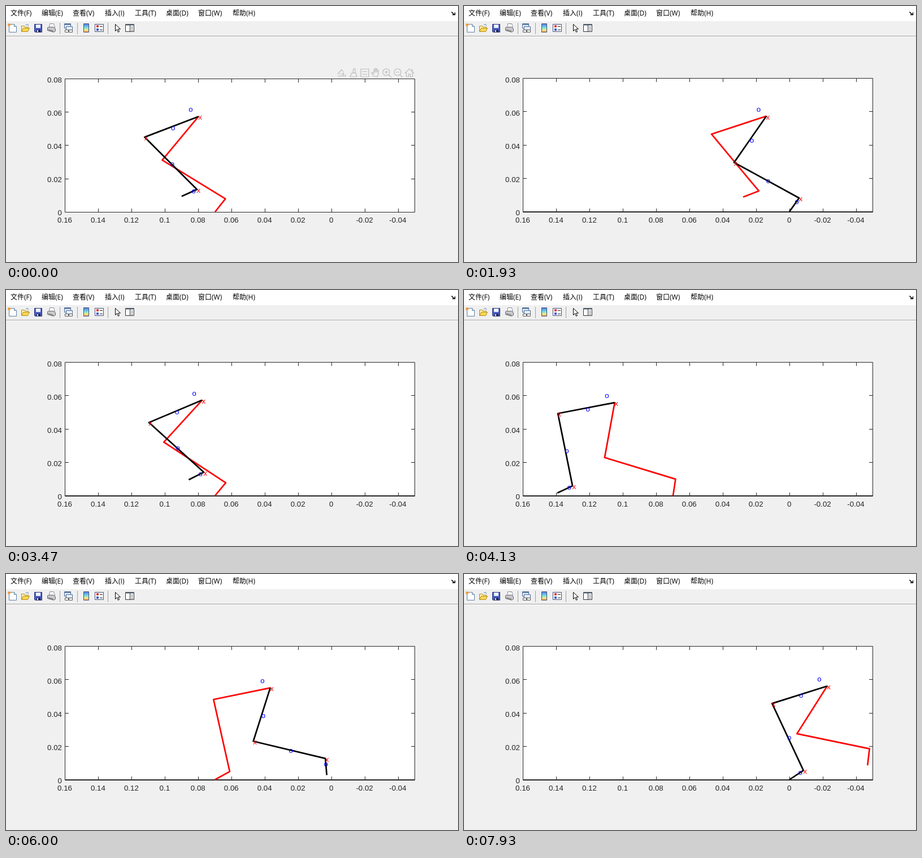
Write an HTML page that moves like this. It is 800 px wide and 455 px high and loops after 8000 ms.

```html
<!DOCTYPE html>
<html lang="zh">
<head>
<meta charset="utf-8">
<title>Walking legs</title>
<style>
html, body { margin: 0; width: 100%; height: 100%; overflow: hidden; background: #f0f0f0; }
svg { display: block; width: 800px; height: 455px; }
.menu { font: 12px "Open Sans", "Noto Sans CJK SC", "Noto Sans CJK JP", "Noto Sans CJK", sans-serif; }
.plot text { font: 13.3px "Liberation Sans", Arial, sans-serif; }
.leg { fill: none; stroke-width: 2.7; stroke-linejoin: round; }
</style>
</head>
<body>
<svg viewBox="0 0 800 455">
  <defs><clipPath id="clip"><rect x="104" y="128" width="620" height="239"/></clipPath></defs>
  <rect width="800" height="455" fill="#f0f0f0"/>
  <rect width="800" height="27" fill="#fff"/>
  <g class="menu" id="menu"></g>
  <path d="M788.5 10.5l5 5M790 15.5h4.5v-4" fill="none" stroke="#000" stroke-width="1.5"/>
  <path d="M0 53.5H800" stroke="#a0a0a0"/>
  <path d="M0 54.5H800" stroke="#fff"/>
  <path d="M95.5 30v20M126.5 30v20M180.5 30v20" stroke="#a0a0a0"/>

  <g id="tools" stroke-width="1">
    <path d="M5.5 32.5h9l4 4v10h-13z" fill="#fff" stroke="#5f7f9f"/>
    <path d="M14.5 32.5v4h4" fill="#dce8f4" stroke="#5f7f9f"/>
    <circle cx="5.5" cy="33.5" r="2.5" fill="#f29a3c"/>
    <path d="M27.5 45.5v-10h5l1 2h6v3" fill="#fff0a8" stroke="#b08a20"/>
    <path d="M27.5 45.5l3-6h11l-3 6z" fill="#ffd84d" stroke="#b08a20"/>
    <path d="M35 34q3-3 5 1" fill="none" stroke="#3c6eb4"/>
    <path d="M50.5 32.5h13v14h-12l-1-1z" fill="#4a5fc8" stroke="#25307c"/>
    <path d="M53 33h8v6h-8z" fill="#eef3ff"/>
    <path d="M54 42h7v4h-7z" fill="#20264e"/>
    <path d="M55 43h2v3h-2z" fill="#fff"/>
    <path d="M76.5 38.5l1-7h7l2 7z" fill="#fff" stroke="#889"/>
    <path d="M73.5 38.5l2-1h9l3 3v4l-3 2-11-3z" fill="#c8c8cc" stroke="#666"/>
    <path d="M75 42l9 3" stroke="#555"/>
    <path d="M103.5 31.5h11v8h-11z" fill="#e4eefa" stroke="#4a6a98"/>
    <path d="M103 32.5h12" stroke="#4a6a98" stroke-width="2"/>
    <path d="M106.5 36.5h11v6h-11z" fill="#e4eefa" stroke="#4a6a98"/>
    <path d="M104.5 42.5h6v4h-6zM111.5 42.5h6v4h-6z" fill="#fff" stroke="#555"/>
    <linearGradient id="bar" x2="0" y2="1">
      <stop stop-color="#5577e0"/><stop offset=".45" stop-color="#70dce8"/>
      <stop offset=".75" stop-color="#f6ee80"/><stop offset="1" stop-color="#f09060"/>
    </linearGradient>
    <path d="M137.5 31.5h9v15h-9z" fill="url(#bar)" stroke="#3f4f78"/>
    <path d="M157.5 32.5h15v13h-15z" fill="#fff" stroke="#3f4f78"/>
    <path d="M160 34h4v4h-4z" fill="#d83c3c"/>
    <path d="M160 40h4v4h-4z" fill="#4058d0"/>
    <path d="M166 36.5h5m-5 6h5" stroke="#222"/>
    <path d="M193.5 32.5v12l3-3 2 5 2-1-2-4.5h4z" fill="#fff" stroke="#000"/>
    <path d="M211.5 32.5h15v13h-15z" fill="#fff" stroke="#333"/>
    <path d="M211 33.5h16" stroke="#567" stroke-width="2"/>
    <path d="M219.5 34v12" stroke="#333"/>
    <path d="M221 37.5h4m-4 3h4m-4 3h4" stroke="#678"/>
  </g>

  <g class="plot">
    <g id="axes"></g>
    <g id="hover" fill="none" stroke="#bdbdbd" stroke-width="1.2">
      <path d="M587 121l7-8 3 4M590 121h8l-2-3m2 3l-2 3M587 124.5h14v-3"/>
      <path d="M615 111.500h3v7h-4zM612 119h7l2 7h-12z"/>
      <path d="M628 112h14v14h-14zM631 116.5h8m-8 5h8"/>
      <path d="M651 125l-4-6 1-1 3 2v-7h2v5-7h2v7-6h2v6-4h2v7l-2 5z"/>
      <circle cx="673" cy="117.5" r="6"/><path d="M677 122l5 5M670 117.5h6m-3-3v6"/>
      <circle cx="693" cy="117.5" r="6"/><path d="M697 122l5 5M690 117.5h6"/>
      <path d="M706 119.5l8-8 8 8M708.5 118v8h4v-5h3v5h4v-8M719 116v-4"/>
    </g>
    <g clip-path="url(#clip)">
      <polyline class="leg" id="red" stroke="#f00"/>
      <polyline class="leg" id="black" stroke="#000"/>
    </g>
    <g id="marks" text-anchor="middle"></g>
  </g>
</svg>
<script>
const $ = id => document.getElementById(id);
const SVG = 'http://www.w3.org/2000/svg';
const LOOP = 8000, TICK = 1000 / 15;

function add(parent, tag, attrs, text) {
  const el = document.createElementNS(SVG, tag);
  for (const k in attrs) el.setAttribute(k, attrs[k]);
  if (text !== undefined) el.textContent = text;
  parent.appendChild(el);
  return el;
}

[['文件(F)', 8], ['编辑(E)', 63], ['查看(V)', 118], ['插入(I)', 175],
 ['工具(T)', 228], ['桌面(D)', 283], ['窗口(W)', 340], ['帮助(H)', 401]]
  .forEach(([s, x]) => add($('menu'), 'text', { x, y: 17 }, s));

// Axes: box, ticks and labels
const ink = '#262626';
const box = add($('axes'), 'path', { fill: '#fff', stroke: ink });
const ground = add($('axes'), 'path', { d: 'M104 365.5H724', stroke: ink });
for (let i = 0; i <= 10; i++) {
  add($('axes'), 'text', { x: 104 + 58.95 * i, y: 385, fill: ink, 'text-anchor': 'middle' },
    +(0.16 - 0.02 * i).toFixed(2));
}
for (let i = 0; i <= 4; i++) {
  add($('axes'), 'text', { x: 99, y: 372 - 59 * i, fill: ink, 'text-anchor': 'end' }, +(0.02 * i).toFixed(2));
}

function drawBox(top) {
  let d = `M104.5 ${top}H723.5V366.5H104.5Z`;
  for (let i = 1; i <= 10; i++) {
    const x = Math.floor(104.5 + 58.95 * i) + 0.5;
    d += `M${x} ${top}v6.5M${x} 366.5v-6.5`;
  }
  for (let i = 1; i <= 3; i++) {
    const y = Math.ceil(366.5 - (366.5 - top) * i / 4) - 0.5;
    d += `M104.5 ${y}h6.5M723.5 ${y}h-6.5`;
  }
  box.setAttribute('d', d);
}

const marks = [...'oxoxoxo'].map(c =>
  add($('marks'), 'text', { fill: c === 'x' ? '#f00' : '#00f' }, c));

// Step phase, then foot, shank and thigh angles of the standing and the swinging leg
const poses = [
  [.054, 27.4, 101.5, 11.5, 93, 165, 76.5],
  [.104, 29.1, 102.6, 12, 94.8, 166.5, 73],
  [.214, 31.8, 109.1, 15.1, 91, 168.3, 64],
  [.276, 33.6, 115, 18.2, 83.2, 168.2, 58.6],
  [.594, 52, 148.4, 51.3, 24.4, 134.9, 21.7],
  [.781, 66.4, 159.2, 73.4, 18.7, 110.6, 11.6],
  [.969, 81.5, 163, 80, 25.3, 101.4, 11.3]
];
// The legs trade roles at every step
const swap = (p, shift) => [p[0] + shift, ...p.slice(4), ...p.slice(1, 4)];
const keys = [swap(poses[5], -1), swap(poses[6], -1), ...poses, swap(poses[0], 1), swap(poses[1], 1)];

const slope = (a, b, j) => (b[j] - a[j]) / (b[0] - a[0]);
function tangent(i, j) {
  const [a, b, c] = [keys[i - 1], keys[i], keys[i + 1]];
  return (slope(a, b, j) * (c[0] - b[0]) + slope(b, c, j) * (b[0] - a[0])) / (c[0] - a[0]);
}
function poseAt(u) {
  let i = 1;
  while (i < keys.length - 3 && keys[i + 1][0] < u) i++;
  const a = keys[i], b = keys[i + 1], h = b[0] - a[0], s = (u - a[0]) / h, r = 1 - s;
  return [1, 2, 3, 4, 5, 6].map(j =>
    r * r * (1 + 2 * s) * a[j] + s * s * (1 + 2 * r) * b[j] +
    h * s * r * (r * tangent(i, j) - s * tangent(i + 1, j)));
}

// Walking pace: tick and number of steps done
const pace = [[0, 1.594], [14, 2.01], [15, 2.054], [43, 3.214], [62, 3.969],
  [90, 5.104], [108, 5.781], [119, 6.276]];
function stepsAt(n) {
  let i = 0;
  while (i < pace.length - 2 && pace[i + 1][0] < n) i++;
  const [a, b] = [pace[i], pace[i + 1]];
  return a[1] + (b[1] - a[1]) * (n - a[0]) / (b[0] - a[0]);
}

// Reach of foot, shank and thigh along x and y
const bones = [[29.7, 29.7], [131.2, 131.2], [102.6, 99.2]];
function bone(k, deg) {
  const a = deg * Math.PI / 180;
  return [bones[k][0] * Math.cos(a), -bones[k][1] * Math.sin(a)];
}
const plus = (p, q, m = 1) => [p[0] + q[0] * m, p[1] + q[1] * m];
const mid = (p, q, m = .5) => [p[0] + (q[0] - p[0]) * m, p[1] + (q[1] - p[1]) * m];

function drawLeg(id, pts) {
  $(id).setAttribute('points', pts.map(p => p.map(v => v.toFixed(2)).join()).join(' '));
}

function render(t) {
  const n = Math.min(119, Math.floor((t + 5) / TICK));
  const early = n < 14;
  drawBox(early ? 129.5 : 128.5);
  ground.style.display = early ? 'none' : '';
  $('hover').style.display = n < 7 ? '' : 'none';

  const steps = stepsAt(n), whole = Math.floor(steps);
  const blackStands = whole % 2 === 0;
  const ang = poseAt(steps - whole);

  const stand = [[blackStands ? 576 : 370, early ? 366 : 365.5]];
  for (let k = 0; k < 3; k++) stand.push(plus(stand[k], bone(k, ang[k])));
  stand.reverse();
  const swing = [stand[0]];
  for (let k = 2; k >= 0; k--) swing.push(plus(swing[2 - k], bone(k, ang[3 + k]), -1));

  const black = blackStands ? stand : swing;
  drawLeg('black', black);
  drawLeg('red', blackStands ? swing : stand);

  const [hip, knee, ankle, toe] = black;
  const dir = [toe[0] - ankle[0], toe[1] - ankle[1]];
  const foot = plus(mid(ankle, toe, .28), [-dir[1], dir[0]], .088);
  [plus(hip, [-16.6, -13.8]), hip, mid(hip, knee), knee, mid(knee, ankle), ankle, foot]
    .forEach((p, i) => {
      marks[i].setAttribute('x', (p[0] + 2.8).toFixed(2));
      marks[i].setAttribute('y', Math.round(p[1] + 5.8));
    });
}

const start = performance.now();
function loop() {
  render((performance.now() - start) % LOOP);
  requestAnimationFrame(loop);
}
loop();
</script>
</body>
</html>
```
